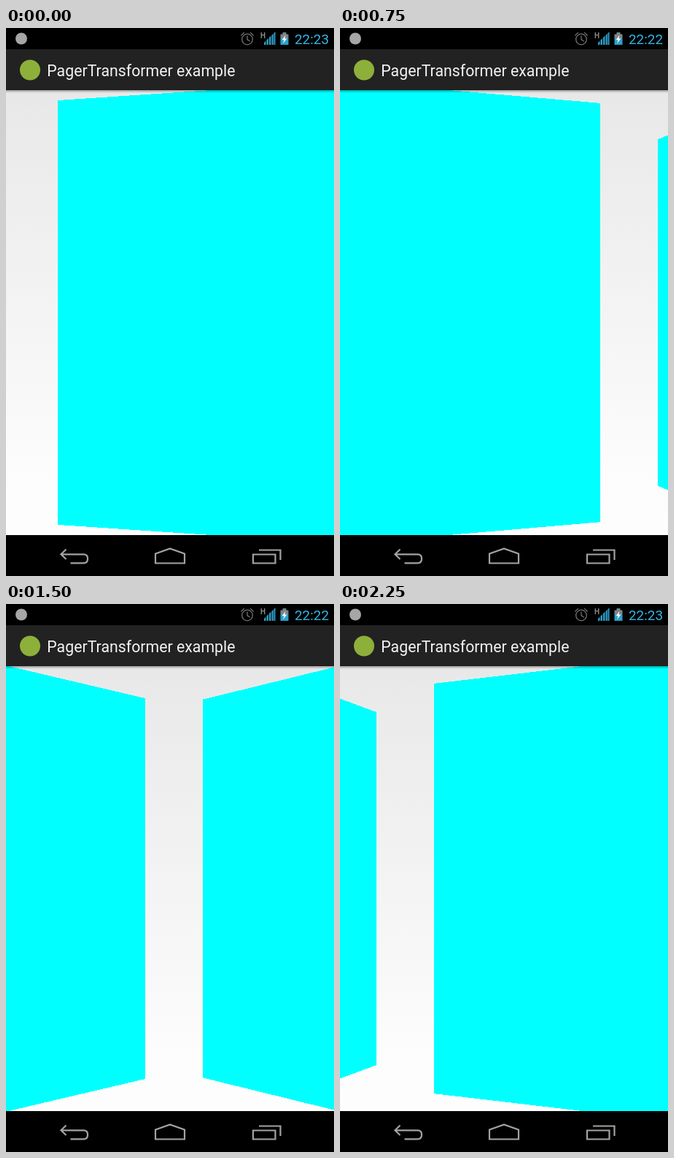
Recreate the animation shown at these times as an HTML page. Size 450 px wide and 750 px high, loop 2.5 s.

```html
<!DOCTYPE html>
<html lang="en">
<head>
<meta charset="utf-8">
<title>Pager</title>
<style>
html, body { margin: 0; width: 100%; height: 100%; overflow: hidden; background: #000; }
svg { display: block; width: 450px; height: 750px; }
text { font-family: Roboto, "Open Sans", sans-serif; }
.page { fill: #0ff; shape-rendering: crispEdges; }
.nav { fill: none; stroke: #a3a3a3; stroke-width: 2.2; }
.alarm { fill: none; stroke: #747474; stroke-width: 1.3; stroke-linecap: round; }
</style>
</head>
<body>
<svg viewBox="0 0 450 750">
  <defs>
    <linearGradient id="back" x2="0" y2="1">
      <stop offset="0" stop-color="#e8e8e8"/>
      <stop offset=".85" stop-color="#fcfcfc"/>
      <stop offset="1" stop-color="#fdfdfd"/>
    </linearGradient>
    <linearGradient id="shade" x2="0" y2="1">
      <stop offset="0" stop-opacity=".32"/>
      <stop offset="1" stop-opacity="0"/>
    </linearGradient>
    <clipPath id="body"><rect y="85" width="450" height="609"/></clipPath>
  </defs>

  <rect width="450" height="750"/>
  <rect y="85" width="450" height="609" fill="url(#back)"/>
  <g clip-path="url(#body)">
    <polygon id="left" class="page"/>
    <polygon id="right" class="page" transform="translate(450) scale(-1 1)"/>
  </g>
  <rect y="85" width="450" height="4" fill="url(#shade)"/>

  <!-- title bar -->
  <rect y="29" width="450" height="56" fill="#222"/>
  <rect y="84" width="450" height="1" fill="#191919"/>
  <circle cx="33" cy="57.5" r="14" fill="#8db03a"/>
  <text x="56.3" y="66" font-size="21.3" fill="#f3f3f3">PagerTransformer example</text>

  <!-- status bar -->
  <circle cx="21" cy="14.5" r="8" fill="#a6a6a6"/>
  <g class="alarm">
    <circle cx="331" cy="15.5" r="7.3"/>
    <path d="M331 11v4.8l3.2 2M322.8 10l3.8-3.6M339.2 10l-3.8-3.6"/>
  </g>
  <text x="349" y="13.5" font-size="10" font-weight="700" fill="#8a8a8a">H</text>
  <path fill="#2c9cc6" d="M354 23v-3l2.5-2.5V23zM357.5 23v-6.5l2.5-2.5v9zM361 23V13l2.5-2.5V23zM364.5 23V10l2.3-2.3V23zM367.5 23V7l2-2v18z"/>
  <path fill="#7d868a" d="M376.5 8.5h3V6h5v2.5h3V14h-11z"/>
  <path fill="#2f9fc9" d="M376.5 14h11v9h-11z"/>
  <path fill="#fff" d="M383.5 10l-5 6.3h3l-1.3 4.7 5.3-6.5h-3.2z"/>
  <text id="clock" x="396" y="21.8" font-size="18.9" fill="#33b5e5">22:23</text>

  <!-- navigation bar -->
  <g class="nav">
    <path d="M82.5 713.5L75.5 720.3l7 6.7M76 720.3h30.5q5.5 0 5.5 5.5v1q0 5.5-5.5 5.5H88.500"/>
    <path d="M205 732.500V719.500l20-7 20 7v13z"/>
    <path d="M339 720.500h30.500v12H339zM347 714.500h29.500V728"/>
  </g>
</svg>
<script>
const STEP = 250, GAP = 79, WIDTH = 450, TOP = 85, BOTTOM = 694;
// right edge of the left page at each step
const edges = [-8, 600, 412, 357, 293, 238, 191, 149, 100, 50];
const $ = id => document.getElementById(id);

// A page turned about its far side: its free edge at x shrinks by `inset`
// and the slope meets the body's top and bottom at `start`.
function pagePoints(x) {
  const inset = 63 - 0.138 * (x - 50) - 7.6e-5 * (x - 50) * (x - 238);
  const start = 149 + 0.877 * (x - 357);
  return [
    [-900, TOP], [start, TOP], [x, TOP + inset],
    [x, BOTTOM - inset], [start, BOTTOM], [-900, BOTTOM]
  ].join(" ");
}

function minute(step) {
  if (step === 1) return 21;
  return step === 0 || step === 9 ? 23 : 22;
}

let shown = -1;
function draw(step) {
  const x = edges[step];
  $("left").setAttribute("points", pagePoints(x));
  $("right").setAttribute("points", pagePoints(WIDTH - x - GAP));
  $("clock").textContent = "22:" + minute(step);
  shown = step;
}

let begin;
function tick(now) {
  begin ??= now;
  const step = Math.floor((now - begin) / STEP) % edges.length;
  if (step !== shown) draw(step);
  requestAnimationFrame(tick);
}
draw(0);
requestAnimationFrame(tick);
</script>
</body>
</html>
```
